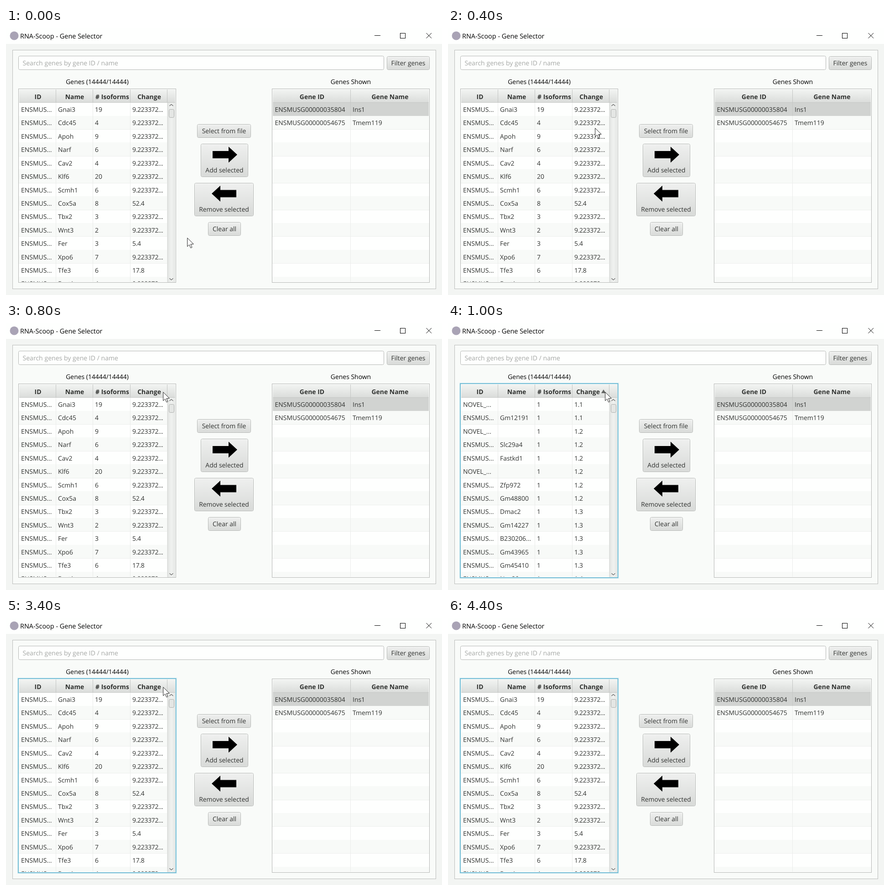
Animation of 956x586 px, one loop 4.8 s. Source, as an HTML page with a canvas:

```html
<!DOCTYPE html>
<html lang="en">
<head>
<meta charset="utf-8">
<title>Gene Selector</title>
<style>
html, body { margin: 0; width: 100%; height: 100%; overflow: hidden; background: #f3f5f3; }
canvas { display: block; }
</style>
</head>
<body>
<canvas id="stage" width="956" height="586"></canvas>
<script>
const ctx = document.getElementById('stage').getContext('2d');
const LOOP = 4800, ROW = 29.42, TOP = 163.2;
const BIG = '9.223372...';

// Each row: name, isoform count, change (BIG when left out)
const parse = text => text.split(',').map(row => row.split(' '));
const unsorted = parse('Gnai3 19,Cdc45 4,Apoh 9,Narf 6,Cav2 4,Klf6 20,Scmh1 6,Cox5a 8 52.4,Tbx2 3,Wnt3 2,Fer 3 5.4,Xpo6 7,Tfe3 6 17.8,Brat1 4');
const ascending = parse(' 1 1.1,Gm12191 1 1.1, 1 1.2,Slc29a4 1 1.2,Fastkd1 1 1.2, 1 1.2,Zfp972 1 1.2,Gm48800 1 1.2,Dmac2 1 1.3,Gm14227 1 1.3,B230206... 1 1.3,Gm43965 1 1.3,Gm45410 1 1.3,Nps20 1 1.4');
const descending = parse('Psap 49,Ctsd 66,Ubc 45,Ctsz 17,Sparc 38,Ubb 30,Lgmn 15,Ctsl 15,Hexb 24,Ctsb 46,Itm2b 30,Fth1 10,Hexa 16,Andr 44');
const shown = [['ENSMUSG00000035804', 'Ins1'], ['ENSMUSG00000054675', 'Tmem119']];

// Start time and pointer place; the pointer leaves at the end
const pointer = [[0, 397, 460], [200, 320, 323], [400, 322, 219], [600, 330, 166],
  [800, 344, 151], [4200, 444, 227], [4400]];

function rect(x, y, w, h, color) {
  ctx.fillStyle = color;
  ctx.fillRect(x, y, w, h);
}

function frame(x, y, w, h, color, width = 1) {
  ctx.strokeStyle = color;
  ctx.lineWidth = width;
  ctx.strokeRect(x + .5, y + .5, w - 1, h - 1);
}

function text(str, x, y, { color = '#303230', align = 'left', size = 13.95, bold = '', gap = 0 } = {}) {
  ctx.font = `${bold} ${size}px "Open Sans", "Noto Sans", sans-serif`;
  ctx.textRendering = 'geometricPrecision';
  ctx.letterSpacing = gap + 'px';
  ctx.textAlign = align;
  ctx.fillStyle = color;
  ctx.fillText(str, x, y);
}

function path(points, fill, stroke, width = 1) {
  ctx.beginPath();
  points.forEach(([x, y]) => ctx.lineTo(x, y));
  if (fill) {
    ctx.closePath();
    ctx.fillStyle = fill;
    ctx.fill();
  }
  if (stroke) {
    ctx.strokeStyle = stroke;
    ctx.lineWidth = width;
    ctx.stroke();
  }
}

function gradient(x0, y0, x1, y1, ...colors) {
  const g = ctx.createLinearGradient(x0, y0, x1, y1);
  colors.forEach((c, i) => g.addColorStop(i / (colors.length - 1), c));
  return g;
}

const shade = (y, h, from, to) => gradient(0, y, 0, y + h, from, to);

function rounded(x, y, w, h, r, fill, stroke) {
  ctx.beginPath();
  ctx.roundRect(x + .5, y + .5, w - 1, h - 1, r);
  ctx.fillStyle = fill;
  ctx.fill();
  ctx.strokeStyle = stroke;
  ctx.lineWidth = 1;
  ctx.stroke();
}

function button(label, x, y, w, h) {
  const face = shade(y, h, '#eff0ef', '#d8dad8');
  rounded(x, y, w, h, 3, face, '#b0b2b0');
  rounded(x + 1, y + 1, w - 2, h - 2, 2, face, shade(y, h, '#fbfdfb', '#dfe1df'));
  text(label, x + w / 2, y + h - 10, { align: 'center' });
}

function bigArrow(tip, y, dir) {
  const at = (dx, dy) => [tip - dir * dx, y + dy];
  path([at(0, 0), at(19, -17.5), at(19, -8), at(54, -8), at(54, 8), at(19, 8), at(19, 17.5)], '#000');
}

function windowBar() {
  rect(0, 0, 956, 35, '#fefffe');
  ctx.beginPath();
  ctx.arc(18, 17, 9.5, 0, 7);
  ctx.fillStyle = '#a9a3b5';
  ctx.fill();
  text('RNA-Scoop - Gene Selector', 31, 23, { size: 14.45, color: '#000' });
  rect(808, 16, 13, 1, '#000');
  frame(864, 11, 12, 12, '#000');
  path([[921.5, 11], [933, 22.5]], null, '#000');
  path([[933, 11], [921.5, 22.5]], null, '#000');
}

// Background, stripes and header of a table; cols are the separator places
function table(x, cols, right, selected) {
  rect(x, 133, 346, 426, '#fefffe');
  ctx.save();
  ctx.beginPath();
  ctx.rect(x + 1, 134, right - x - 1, 423);
  ctx.clip();
  for (let i = 0; i < 14; i++) {
    const y = Math.round(TOP + i * ROW), end = Math.round(TOP + (i + 1) * ROW);
    if (i % 2) rect(x, y, 346, end - y, '#f8faf8');
    rect(x, end, 346, 1, '#edefed');
  }
  if (selected) rect(x + 2, 164, 342, 29, '#d1d3d1');
  cols.forEach(c => rect(c, 164, 1, 394, '#eaecea'));
  if (selected) rect(cols[0], 164, 1, 29, '#c6c8c6');
  ctx.restore();
  rect(x + 2, 135, 342, 29, shade(135, 29, '#f2f4f2', '#dadcda'));
  rect(x + 2, 163, 342, 1, '#c6c8c6');
  cols.forEach(c => rect(c, 135, 1, 29, '#c3c5c3'));
}

function scrollBar() {
  rect(354, 164, 1, 394, '#d6d8d6');
  rect(355, 164, 16, 394, gradient(355, 0, 371, 0, '#e4e6e4', '#f0f2f0', '#e4e6e4'));
  rounded(357, 178, 12, 19, 3, '#e4e6e4', '#adafad');
  path([[358.5, 171], [362.5, 167.5], [366.5, 171]], null, '#666', 1.3);
  path([[358.5, 549.5], [362.5, 553], [366.5, 549.5]], null, '#666', 1.3);
}

function cells(rows, places) {
  ctx.save();
  ctx.beginPath();
  ctx.rect(28, 134, 900, 423);
  ctx.clip();
  rows.forEach((row, i) => row.forEach((cell, c) =>
    text(cell, places[c], Math.round(184 + i * ROW), { gap: c == 3 ? -.28 : 0 })));
  ctx.restore();
}

function headings(list) {
  list.forEach(([label, x]) => text(label, x, 156, { bold: 'bold', align: 'center' }));
}

function geneTable(t) {
  const sort = t < 1000 || t >= 3400 ? 0 : t < 1800 ? 1 : -1;
  const rows = sort == 0 ? unsorted : sort == 1 ? ascending : descending;
  table(27, [109, 190, 272, 353], 355);
  scrollBar();
  headings([['ID', 70], ['Name', 150.5], ['# Isoforms', 233], ['Change', sort ? 307 : 314]]);
  if (sort) path([[336, 150 + sort * 4], [346, 150 + sort * 4], [341, 150 - sort * 4]], '#636563');
  cells(rows.map(([name, count, change = BIG]) =>
    [name ? 'ENSMUS...' : 'NOVEL_...', name, count, change]), [33, 114, 195, 277]);
  if (t < 1000) {
    frame(27, 133, 346, 426, '#b4b6b4');
  } else {
    frame(26, 132, 348, 428, 'rgba(3,158,211,.13)', 3);
    frame(26.5, 132.5, 346.5, 427, '#5fb2cd', 1.6);
  }
}

function shownTable() {
  table(583, [755], 928, true);
  headings([['Gene ID', 671], ['Gene Name', 842]]);
  cells(shown, [589.5, 760]);
  frame(583, 133, 346, 426, '#b4b6b4');
}

function drawPointer(t) {
  const [, x, y] = pointer.filter(p => p[0] <= t).pop();
  if (x === undefined) return;
  const shape = [[.7, .8], [.7, 19.6], [4.9, 15.7], [8, 22.8], [10.9, 21.5], [7.9, 14.6], [14.2, 14.2]];
  path([...shape, shape[0]].map(([dx, dy]) => [x + dx, y + dy]), '#fff', '#222');
}

function draw(t) {
  rect(0, 0, 956, 586, '#f3f5f3');
  windowBar();
  rect(14, 48, 929, 525, '#f9fbf9');
  frame(14, 48, 929, 525, '#bbbdbb');
  rounded(27, 61, 802, 31, 3, '#fefffe', '#b5b7b5');
  text('Search genes by gene ID / name', 36.5, 82, { color: '#a5a7a5', size: 14.08 });
  text('Genes (14444/14444)', 200, 123, { color: '#000', align: 'center' });
  text('Genes Shown', 756, 123, { color: '#000', align: 'center' });
  button('Filter genes', 835, 62, 94, 30);
  button('Select from file', 419, 211, 118, 30);
  button('Add selected', 427, 254, 104, 73);
  button('Remove selected', 413, 340, 130, 73);
  button('Clear all', 443, 426, 72, 30);
  bigArrow(507, 278, 1);
  bigArrow(451, 363.5, -1);
  geneTable(t);
  shownTable();
  drawPointer(t);
}

const start = performance.now();
function tick() {
  draw((performance.now() - start) % LOOP);
  requestAnimationFrame(tick);
}
tick();
</script>
</body>
</html>
```
